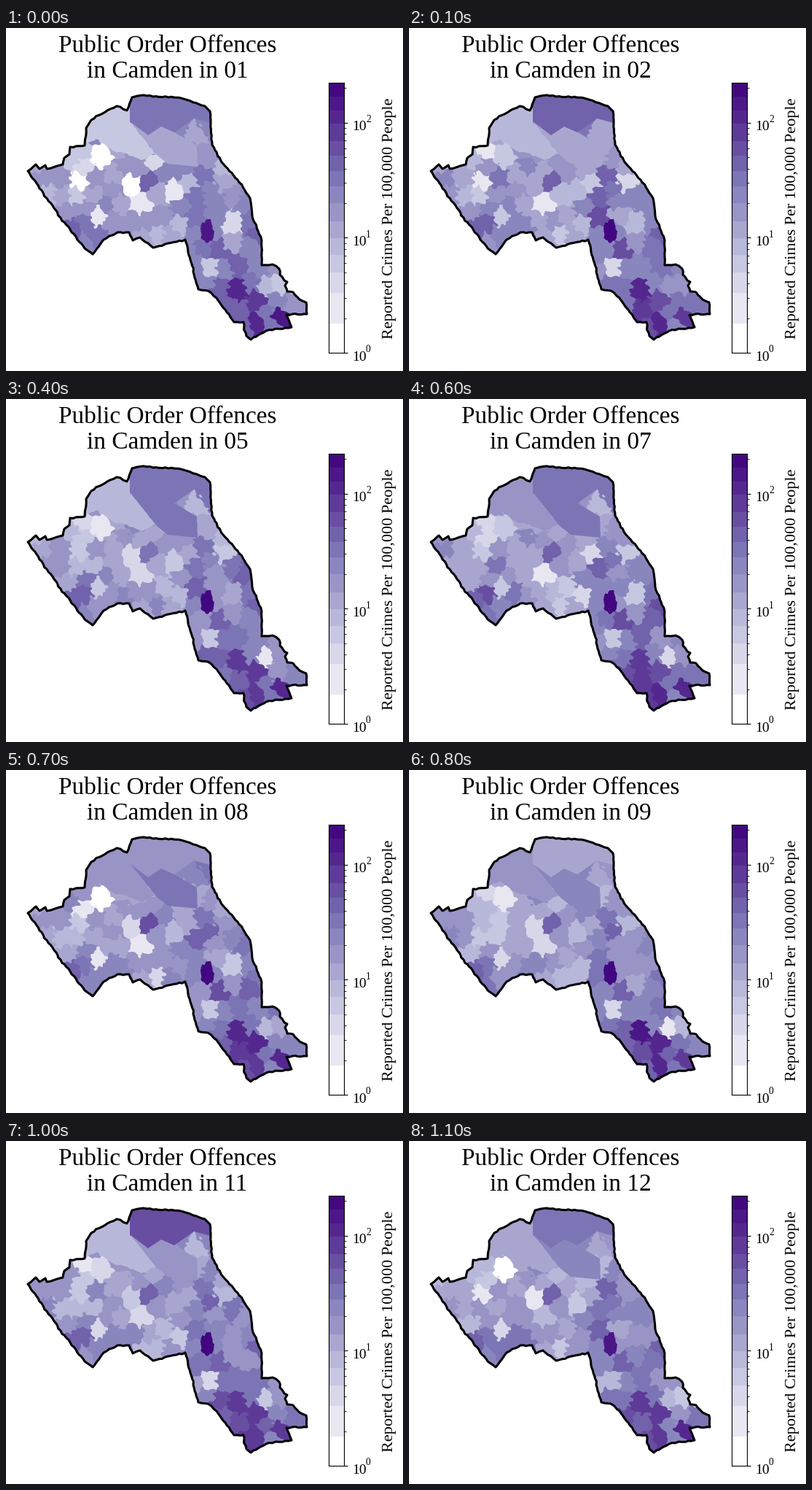
Write a matplotlib script that moves like this. It is 545 px wide and 470 px high and loops after 1200 ms.

```python
import numpy as np
import matplotlib.pyplot as plt
from matplotlib.animation import FuncAnimation
from matplotlib.path import Path

plt.rcParams["font.family"] = "Liberation Serif"

W, H, DPI = 545, 470, 100
SS = 2                          # supersampling of the map
BAR_X, BAR_Y = 443, 445         # foot of the colour bar
BAR_W, BAR_H = 21, 370
DECADE = 157.6                  # bar pixels per power of ten
MONTHS = np.arange(1, 13)
rng = np.random.default_rng(12)

# Colour classes, measured in pixels from the foot of the bar
EDGES = np.array([0, 40, 82, 110, 134, 157, 180, 205, 228,
                  249, 270, 290, 314, 332, 351, 370])
COLORS = plt.get_cmap("Purples")((EDGES[:-1] + EDGES[1:]) / 2 / BAR_H)[:, :3]
COLORS[0] = 1

OUTLINE = [
    (30, 196), (41, 187), (46, 193), (54, 188), (56, 193), (78, 187),
    (80, 178), (87, 173), (88, 163), (108, 161), (110, 137), (117, 126),
    (139, 113), (152, 107), (166, 113), (173, 95), (189, 92), (240, 96),
    (273, 107), (280, 114), (283, 160), (298, 186), (318, 208), (335, 233),
    (339, 262), (351, 291), (351, 325), (366, 324), (375, 330), (376, 338),
    (386, 348), (383, 353), (386, 361), (394, 362), (403, 372), (412, 376),
    (413, 392), (385, 393), (392, 410), (357, 415), (336, 427), (330, 422),
    (326, 403), (313, 403), (289, 370), (277, 360), (264, 358), (246, 290),
    (202, 301), (184, 287), (174, 291), (169, 280), (153, 280), (134, 290),
    (119, 310), (108, 302), (75, 260),
]
NORTH_WEST = [(108, 160), (108, 105), (171, 100), (171, 129), (205, 172),
              (186, 181), (166, 172), (147, 168), (124, 152)]
HEATH = [(170, 129), (170, 88), (245, 88), (290, 108), (284, 131),
         (258, 124), (231, 143), (213, 135), (195, 147)]
PARLIAMENT = [(171, 129), (195, 147), (213, 135), (231, 143), (262, 161),
              (263, 190), (222, 186), (207, 174)]

# Local highs and lows: x, y, mean level
SPOTS = [
    (104, 168, 2.5), (130, 175, 1), (106, 191, 3), (103, 210, 2.5),
    (126, 258, 2), (172, 212, 2), (186, 243, 2), (194, 208, 9),
    (228, 224, 4), (236, 268, 4), (206, 283, 3.5), (262, 145, 4),
    (271, 202, 8.5), (299, 209, 4), (312, 268, 4), (258, 262, 8.5),
    (292, 304, 10), (281, 330, 2), (357, 354, 3), (318, 359, 11.2),
    (344, 374, 11), (374, 394, 12), (345, 405, 11), (318, 386, 10),
]
# General trend for all other districts: x, y, level
TREND = [
    (55, 210, 6), (90, 225, 4.5), (108, 285, 8), (150, 235, 5.5),
    (210, 260, 5), (240, 200, 5.5), (272, 230, 8), (305, 235, 6),
    (348, 290, 8), (310, 300, 5.5), (262, 315, 7), (330, 330, 8),
    (325, 375, 11), (372, 345, 5), (402, 382, 7),
]


def course(*levels):
    """Monthly levels through a few known months."""
    return np.interp(MONTHS, (1, 2, 5, 7, 9, 11, 12), levels)


def wobble(level):
    """Monthly levels about a mean; quiet districts vary most."""
    return level + rng.normal(0, 1.4 if level < 5 else 0.7, 12)


def roughen(points, size, step=4):
    """Split the edges of a closed shape and shake the new corners."""
    points = np.array(points, float)
    out = []
    for a, b in zip(points, np.roll(points, -1, axis=0)):
        n = max(1, int(np.hypot(*(b - a)) / step))
        out += [a + (b - a) * k / n + rng.normal(0, size if k else 0, 2)
                for k in range(n)]
    return np.array(out)


def ripple(x, y, amp=0.75, waves=7):
    """Sum of triangle waves, which roughens straight borders."""
    total = np.zeros_like(x)
    for _ in range(waves):
        angle, phase = rng.uniform(0, 2 * np.pi, 2)
        k = 2 * np.pi / rng.uniform(7, 20)
        wave = np.sin(k * (x * np.cos(angle) + y * np.sin(angle)) + phase)
        total += amp * np.arcsin(wave)
    return total


def distances(points, p):
    return np.hypot(*(np.array(points)[:, :2] - p).T)


def trend(p):
    weight = (distances(TREND, p) + 3) ** -3.0
    return weight @ np.array(TREND)[:, 2] / weight.sum()


def build_sites(area, gap=17.5):
    """Centres of the districts and their level in each month."""
    sites = [s[:2] for s in SPOTS]
    levels = [wobble(s[2]) for s in SPOTS]
    for p in rng.uniform((30, 125), (413, 428), (2500, 2)):
        if area.contains_point(p) and distances(sites, p).min() > gap:
            sites.append(tuple(p))
            levels.append(wobble(trend(p) + rng.normal(0, 0.6)))
    return sites, levels


def build_labels(sites, shapes, area):
    """District number of each fine pixel, -1 outside the borough."""
    y, x = (np.mgrid[:H * SS, :W * SS] + 0.5) / SS
    pixels = np.column_stack([x.ravel(), y.ravel()])
    wx, wy = x + ripple(x, y), y + ripple(x, y)
    best = np.full(x.shape, np.inf)
    labels = np.zeros(x.shape, int)
    for i, (sx, sy) in enumerate(sites):
        d = (wx - sx) ** 2 + (wy - sy) ** 2
        closer = d < best
        best[closer] = d[closer]
        labels[closer] = i
    for i, corners in enumerate(shapes, len(sites)):
        labels[Path(corners).contains_points(pixels).reshape(x.shape)] = i
    labels[~area.contains_points(pixels).reshape(x.shape)] = -1
    return labels


outline = roughen(OUTLINE, 0.5)
area = Path(outline)
turn = np.linspace(0, 2 * np.pi, 22, endpoint=False)
radius = 1 + 0.13 * rng.normal(size=turn.size)
station = np.column_stack([276 + 10 * radius * np.cos(turn),
                           279 + 16 * radius * np.sin(turn)])
shapes = [roughen(NORTH_WEST, 0.6), HEATH, PARLIAMENT, station]

sites, levels = build_sites(area)
levels += [
    course(3, 4, 4, 6, 6, 4, 5),
    course(8, 9, 8, 8, 5, 10, 8),
    course(5, 5, 8, 8, 7, 6, 7),
    course(13, 14, 14, 14, 14, 14, 13),
]
labels = build_labels(sites, shapes, area)
classes = np.clip(np.rint(levels), 0, len(COLORS) - 1).astype(int)


def month_image(i):
    palette = np.vstack([COLORS[classes[:, i]], [1, 1, 1]])
    return palette[labels].reshape(H, SS, W, SS, 3).mean(axis=(1, 3))


images = [month_image(i) for i in range(12)]

fig = plt.figure(figsize=(W / DPI, H / DPI), dpi=DPI, facecolor="white")
ax = fig.add_axes([0, 0, 1, 1])
ax.axis("off")
borough = ax.imshow(images[0], extent=(0, W, H, 0), aspect="auto",
                    interpolation="nearest")
ax.fill(*outline.T, fill=False, ec="black", lw=2.2, joinstyle="round")
ax.set(xlim=(0, W), ylim=(H, 0))

ax.text(222, 33, "Public Order Offences", size=24, ha="center")
title = ax.text(221.5, 68, "", size=24, ha="center")
ax.text(531, 261, "Reported Crimes Per 100,000 People", size=16,
        rotation=90, rotation_mode="anchor", ha="center")

# Colour bar
bar = fig.add_axes([BAR_X / W, 1 - BAR_Y / H, BAR_W / W, BAR_H / H])
values = 10 ** (EDGES / DECADE)
for low, high, color in zip(values[:-1], values[1:], COLORS):
    bar.axhspan(low, high, color=color, lw=0)
bar.set_yscale("log")
bar.set(xlim=(0, 1), ylim=(1, values[-1]), xticks=[])
bar.yaxis.tick_right()
bar.set_yticks([1, 10, 100], [""] * 3)
for power in range(3):
    y = BAR_Y - power * DECADE
    ax.text(475, y + 10.5, "10", size=14)
    ax.text(494, y - 0.5, str(power), size=9.8)


def update(i):
    borough.set_data(images[i])
    title.set_text(f"in Camden in {i + 1:02d}")
    return borough, title


anim = FuncAnimation(fig, update, frames=12, interval=100, repeat=True)
plt.show()
```
